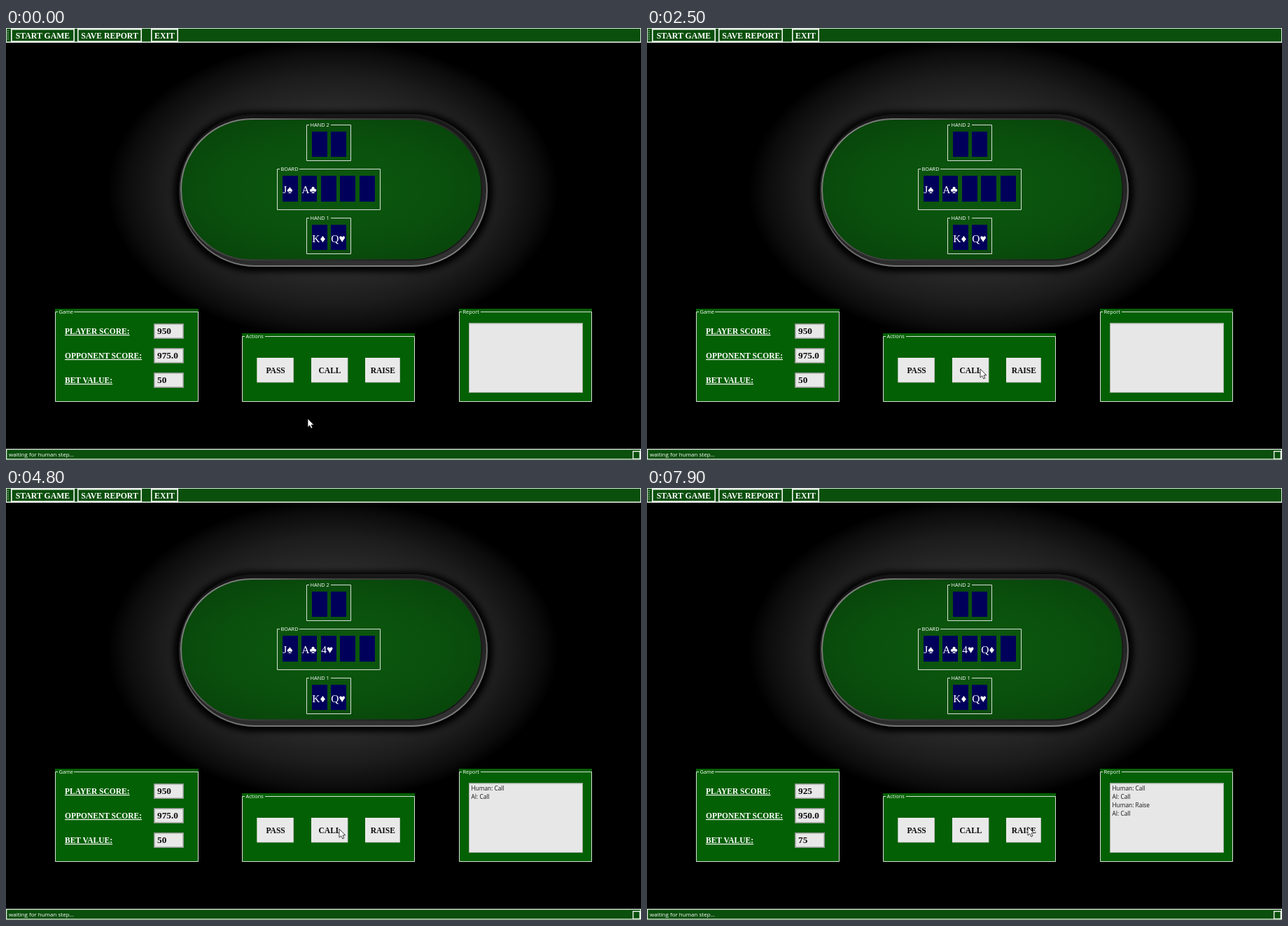
These frames come from a looping animation (907x617 px, 8 s). An HTML page:

```html
<!DOCTYPE html>
<html lang="en">
<head>
<meta charset="utf-8">
<title>Poker table</title>
<style>
  html, body { margin: 0; width: 100%; height: 100%; overflow: hidden; background: #000; }
  svg { display: block; width: 907px; height: 617px; }
  text { white-space: pre; }
  .ui { font: 7.4px "Open Sans", "Noto Sans", sans-serif; fill: #fff; }
  .status { font-size: 8px; }
  .log { font-size: 8.3px; fill: #111; }
  .caps { font: bold 11.5px "Liberation Serif", serif; fill: #fff; }
  .bar { font-size: 11.8px; }
  .under { text-decoration: underline; }
  .dark { fill: #0a0a0a; }
  .value { font: bold 13.3px "Liberation Serif", serif; fill: #0a0a0a; }
  .card { font: 15.5px "Liberation Serif", serif; fill: #fff; }
</style>
</head>
<body>
<svg id="stage" viewBox="0 0 907 617" xmlns="http://www.w3.org/2000/svg">
  <defs>
    <radialGradient id="glow">
      <stop offset="0" stop-color="#333"/>
      <stop offset=".52" stop-color="#2b2b2b"/>
      <stop offset=".76" stop-color="#1c1c1c"/>
      <stop offset=".92" stop-color="#0c0c0c"/>
      <stop offset="1" stop-color="#000"/>
    </radialGradient>
    <radialGradient id="felt" r=".62">
      <stop offset="0" stop-color="#0c590e"/>
      <stop offset=".6" stop-color="#0a500d"/>
      <stop offset="1" stop-color="#08440a"/>
    </radialGradient>
    <linearGradient id="rail" x1="0" y1="0" x2=".4" y2="1">
      <stop offset="0" stop-color="#141414"/>
      <stop offset=".6" stop-color="#1c1c1c"/>
      <stop offset="1" stop-color="#303030"/>
    </linearGradient>
    <linearGradient id="innerRim" x1="0" y1=".1" x2="1" y2=".5">
      <stop offset="0" stop-color="#8c8c8c"/>
      <stop offset=".2" stop-color="#707070"/>
      <stop offset=".4" stop-color="#444"/>
      <stop offset="1" stop-color="#1a1a1a"/>
    </linearGradient>
    <linearGradient id="outerRim" x1=".3" y1="0" x2=".7" y2="1">
      <stop offset="0" stop-color="#141414"/>
      <stop offset=".35" stop-color="#2c2c2c"/>
      <stop offset=".6" stop-color="#666"/>
      <stop offset="1" stop-color="#808080"/>
    </linearGradient>
    <filter id="soft" x="-10%" y="-10%" width="120%" height="120%">
      <feGaussianBlur stdDeviation="4"/>
    </filter>
  </defs>
</svg>
<script>
const NS = "http://www.w3.org/2000/svg";
const stage = document.getElementById("stage");

function add(tag, attrs, content) {
  const node = document.createElementNS(NS, tag);
  for (const key in attrs) node.setAttribute(key, attrs[key]);
  if (content !== undefined) node.textContent = content;
  return stage.appendChild(node);
}
const rect = (x, y, width, height, fill, more) => add("rect", { x, y, width, height, fill, ...more });
const label = (x, y, cls, content, more) => add("text", { x, y, class: cls, ...more }, content);
const frame = (x, y, w, h, stroke, width = 1) =>
  rect(x + width / 2, y + width / 2, w - width, h - width, "none", { stroke, "stroke-width": width });

// Titled box whose top line breaks around the title
function group(x, y, w, h, title, gap, fill) {
  if (fill) rect(x, y - 4, w, h + 4, fill);
  const l = x + .5, t = y + .5, r = x + w - .5, b = y + h - .5;
  add("path", {
    d: `M${x + 4} ${t}H${l}V${b}H${r}V${t}H${x + 5 + gap}`,
    fill: "none", stroke: "#d8e2d8"
  });
  label(x + 5.5, y + 3.4, "ui", title);
}

function drawTable() {
  add("ellipse", { cx: 467, cy: 231, rx: 322, ry: 214, fill: "url(#glow)" });
  rect(240, 119, 455, 229, "#030303", { rx: 114, filter: "url(#soft)" });
  rect(247, 123, 441, 218, "url(#rail)", { rx: 109 });
  rect(248, 124, 439, 216, "none", { rx: 108, stroke: "url(#outerRim)", "stroke-width": 2 });
  rect(250, 130, 429.5, 201.5, "url(#felt)", { rx: 100.5, stroke: "url(#innerRim)", "stroke-width": 2 });
}

function drawBars() {
  rect(0, 0, 907, 21, "#0a4f0c");
  frame(0, 0, 907, 21, "#dce8dc");
  rect(0, 19.5, 907, 1.5, "#f0f5f0");
  for (let y = 3; y < 18; y += 3) rect(2, y, 1.5, 1.5, "#9db89d");
  for (const [x, w, name] of [[7, 91, "START GAME"], [102, 92, "SAVE REPORT"], [207, 39, "EXIT"]]) {
    frame(x, 1, w, 19, "#f4f8f4", 1.6);
    label(x + w / 2, 14.6, "caps bar", name, { "text-anchor": "middle" });
  }
  rect(0, 601, 907, 16, "#0a4f0c");
  frame(0, 601, 907, 15.5, "#e4ece4", 1.3);
  frame(895, 604, 11, 12, "#f4f8f4", 1.3);
  label(4, 611.8, "ui status", "waiting for human step...");
}

function drawCards(x, y, count, step, h) {
  return Array.from({ length: count }, (_, i) => {
    const left = Math.round(x + i * step);
    rect(left, y, 22, h, "#00005a");
    return label(left + .3, y + 24.5, "card", "");
  });
}

function drawInput(y, name) {
  label(84, y + 15, "caps under", name);
  rect(211, y, 43, 22, "#e8e8e8");
  frame(211, y, 43, 22, "#8c938c", 1.5);
  return label(216, y + 15.3, "value", "");
}

function drawButton(x, w, name) {
  rect(x, 471, w, 35.5, "#a4aca4");
  rect(x, 471, w - .7, 34.8, "#e9e9e9");
  label(x + w / 2 + .3, 493.3, "caps dark", name, { "text-anchor": "middle" });
}

drawTable();
drawBars();

group(429, 138, 64, 52, "HAND 2", 30);
drawCards(437, 148, 2, 26.5, 36);
group(387, 201, 148, 59, "BOARD", 27);
const board = drawCards(395, 211, 5, 27.4, 37);
group(429, 271, 64, 52, "HAND 1", 30);
const hand = drawCards(437, 281, 2, 26.5, 36);
hand[0].textContent = "K♦";
hand[1].textContent = "Q♥";

const GREEN = "#046004";
group(70, 405, 205, 129, "Game", 22, GREEN);
const values = [[422, "PLAYER SCORE:"], [457, "OPPONENT SCORE:"], [492, "BET VALUE:"]]
  .map(row => drawInput(...row));
group(337, 440, 247, 94, "Actions", 28, GREEN);
drawButton(358.5, 52.5, "PASS");
drawButton(436, 52.5, "CALL");
drawButton(513, 50, "RAISE");
group(647, 405, 190, 129, "Report", 26, GREEN);
rect(661, 421.5, 163, 99.5, "#e7e7e7");
frame(661, 421.5, 163, 99.5, "#a3ada3");
const log = [432, 444, 456, 468].map(y => label(664.5, y, "ui log", ""));

const cursor = add("path", {
  d: "M0 0V12.2L2.8 9.7L4.8 14L6.9 13L5 8.9H8.8Z",
  fill: "#fff", stroke: "#111", "stroke-width": .8
});

const LOOP = 8000, CALL_AT = 3000, RAISE_AT = 7500;
const cards = ["J♠", "A♣", "4♥", "Q♦", ""];
const lines = ["Human: Call", "AI: Call", "Human: Raise", "AI: Call"];
// time, x, y of the pointer tip
const path = [
  [0, 431, 558], [100, 431, 558], [1200, 526, 512], [2200, 476, 487],
  [5400, 476, 487], [5600, 483, 486], [6600, 544, 484], [LOOP, 544, 484]
];

function pointerAt(t) {
  const i = path.findIndex(p => p[0] > t);
  const [t0, x0, y0] = path[i - 1], [t1, x1, y1] = path[i];
  const k = (t - t0) / (t1 - t0), e = k * k * (3 - 2 * k);
  return [x0 + (x1 - x0) * e, y0 + (y1 - y0) * e].map(Math.round);
}

function setText(node, content) {
  if (node.textContent !== content) node.textContent = content;
}

function render(t) {
  const steps = (t >= CALL_AT) + (t >= RAISE_AT);
  board.forEach((node, i) => setText(node, i < 2 + steps ? cards[i] : ""));
  log.forEach((node, i) => setText(node, i < 2 * steps ? lines[i] : ""));
  const scores = steps > 1 ? ["925", "950.0", "75"] : ["950", "975.0", "50"];
  values.forEach((node, i) => setText(node, scores[i]));
  cursor.setAttribute("transform", `translate(${pointerAt(t)})`);
}

const start = performance.now();
function tick() {
  render((performance.now() - start) % LOOP);
  requestAnimationFrame(tick);
}
tick();
</script>
</body>
</html>
```
